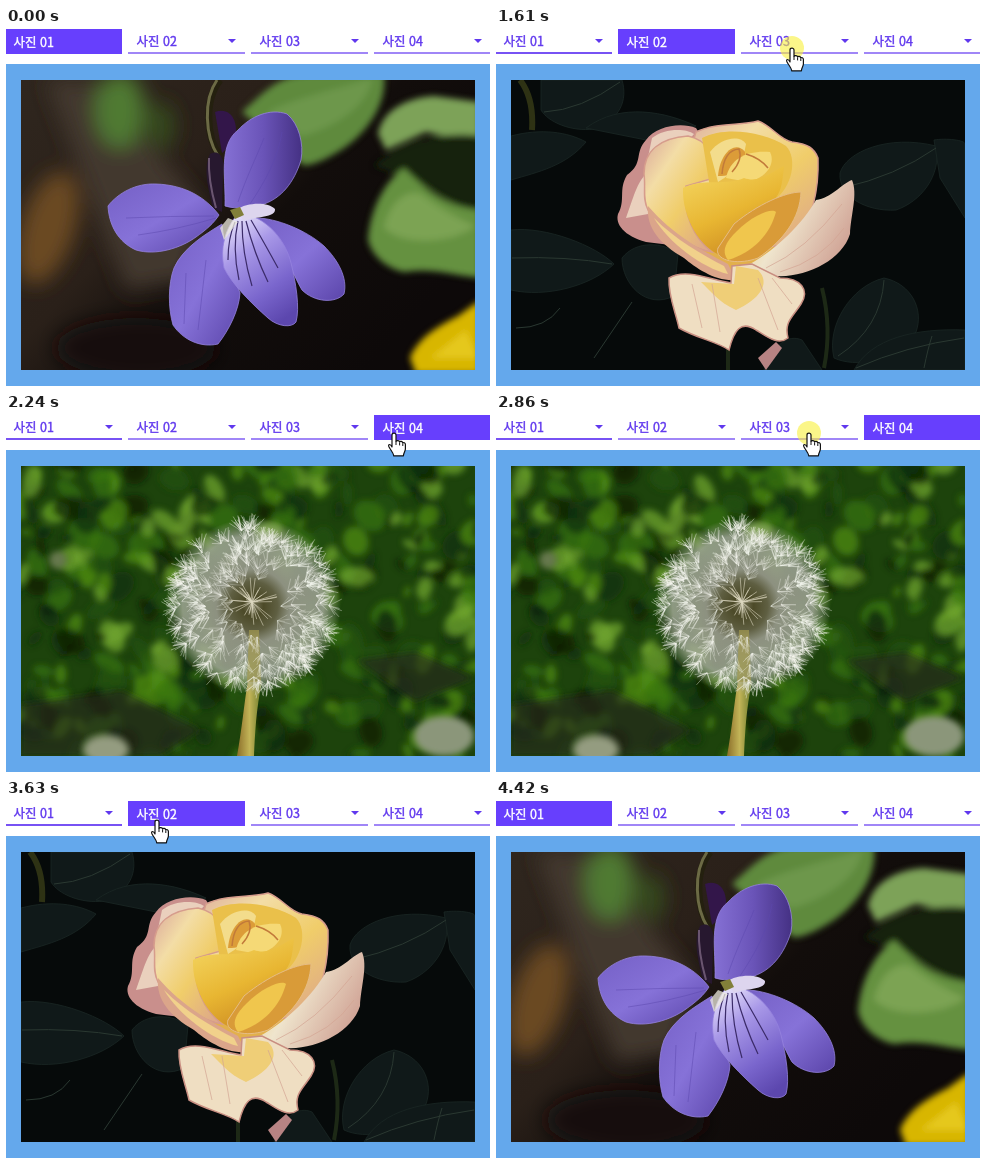
Animation of 484 by 358 pixels, one loop 4.73 s. Source, as an HTML page:

```html
<!DOCTYPE html>
<html lang="ko">
<head>
<meta charset="utf-8">
<title>사진 탭</title>
<style>
  :root { --ink: #6038ee; --loop: 4730ms infinite both; }
  html, body { margin: 0; width: 100%; height: 100%; overflow: hidden; background: #fff; }
  #stage { position: absolute; left: 0; top: 0; width: 484px; height: 358px; overflow: hidden; }
  #frame { position: absolute; left: 0; top: 36px; width: 484px; height: 322px; background: #64a8ec; }
  .photo { position: absolute; left: 15px; top: 52px; width: 454px; height: 290px; overflow: hidden; }

  .tab { position: absolute; top: 1px; width: 117px; height: 25px; --line: #a086f7;
    font: 500 12.5px/23px "Noto Sans CJK KR", "Noto Sans CJK", "Noto Sans", sans-serif;
    color: var(--ink); -webkit-text-stroke: .4px; }
  .tab:first-child { --line: #7752f4; }
  .tab span, .tab b { position: absolute; inset: 0; padding-left: 8.5px; font-weight: 500; white-space: nowrap; }
  .tab span { height: 23px; border-bottom: 2px solid var(--line); }
  .tab span::after { content: ""; position: absolute; left: 100px; top: 10px;
    border: 4.5px solid transparent; border-top-color: var(--ink); border-bottom: 0; }
  .tab b { background: #673ffd; color: #fff; line-height: 25px; }

  .on1 { animation: on1 var(--loop) step-end; }
  .on2 { animation: on2 var(--loop) step-end; }
  .on3 { animation: on3 var(--loop) step-end; }
  .on4 { animation: on4 var(--loop) step-end; }
  @keyframes on1 { 0%, 83.5%, 100% { opacity: 1 } 22.8% { opacity: 0 } }
  @keyframes on2 { 0%, 36.1%, 83.5%, 100% { opacity: 0 } 22.8%, 76.5% { opacity: 1 } }
  @keyframes on3 { 0%, 47.3%, 76.5%, 100% { opacity: 0 } 36.1%, 63.6% { opacity: 1 } }
  @keyframes on4 { 0%, 63.6%, 100% { opacity: 0 } 47.3% { opacity: 1 } }

  #pointer { position: absolute; left: 0; top: 0; width: 1px; height: 1px; overflow: visible;
    animation: move var(--loop) linear, seen var(--loop) step-end; }
  #disc { animation: disc var(--loop) step-end; }
  #hand { animation: hand var(--loop) step-end; }
  #arrow { animation: arrow var(--loop) step-end; }
  @keyframes move {
    0%, 2.96% { transform: translate(218px, 262px) }
    5.5% { transform: translate(152px, 165px) }
    8.5% { transform: translate(92px, 62px) }
    10.8% { transform: translate(94px, 24px) }
    12.9%, 14.1% { transform: translate(133px, 20px) }
    19.2%, 24.6% { transform: translate(162px, 18px) }
    34%, 37.8% { transform: translate(296px, 20px) }
    44.1%, 52.6% { transform: translate(388px, 19px) }
    60.4%, 68.8% { transform: translate(313px, 19px) }
    76.7%, 78.6% { transform: translate(151px, 20px) }
    81%, 83.5% { transform: translate(58px, 18px) }
    92.4%, 100% { transform: translate(426px, 355px) }
  }
  @keyframes seen { 0%, 93.4%, 100% { opacity: 0 } 2.96% { opacity: 1 } }
  @keyframes disc { 0%, 26%, 39.3%, 54.1%, 66.8% { opacity: 1 } 22.8%, 36.1%, 47.3%, 63.6%, 76%, 100% { opacity: 0 } }
  @keyframes hand { 0%, 85%, 100% { opacity: 0 } 10.4% { opacity: 1 } }
  @keyframes arrow { 0%, 85%, 100% { opacity: 1 } 10.4% { opacity: 0 } }
</style>
</head>
<body>
<div id="stage">
  <div class="tab" style="left:-1px"><span>사진 01</span><b class="on1">사진 01</b></div>
  <div class="tab" style="left:122px"><span>사진 02</span><b class="on2">사진 02</b></div>
  <div class="tab" style="left:245px"><span>사진 03</span><b class="on3">사진 03</b></div>
  <div class="tab" style="left:368px"><span>사진 04</span><b class="on4">사진 04</b></div>
  <div id="frame"></div>

  <svg class="photo on1" viewBox="15 52 454 290">
    <defs>
      <filter id="soft" x="-30%" y="-30%" width="160%" height="160%"><feGaussianBlur stdDeviation="3"/></filter>
      <filter id="haze" x="-40%" y="-40%" width="180%" height="180%"><feGaussianBlur stdDeviation="10"/></filter>
      <linearGradient id="soil" x2="1" y2=".6"><stop stop-color="#2f261e"/><stop offset=".4" stop-color="#2a2019"/><stop offset=".62" stop-color="#120d0b"/><stop offset="1" stop-color="#0d0909"/></linearGradient>
      <linearGradient id="violet" x2="1" y2="1"><stop stop-color="#7560c6"/><stop offset=".5" stop-color="#8672d8"/><stop offset="1" stop-color="#5b45aa"/></linearGradient>
      <linearGradient id="violetTop" x2="1"><stop stop-color="#8570d4"/><stop offset=".5" stop-color="#6a54b8"/><stop offset="1" stop-color="#453184"/></linearGradient>
      <linearGradient id="violetLip" x1=".2" x2=".7" y2="1"><stop stop-color="#e6e1fa"/><stop offset=".3" stop-color="#a999e8"/><stop offset=".7" stop-color="#7a66cd"/><stop offset="1" stop-color="#5c47ae"/></linearGradient>
    </defs>
    <path fill="url(#soil)" d="M15 52h454v290H15z"/>
    <g filter="url(#haze)">
      <path fill="#43382e" d="M40 52h50l110 130-20 70-60 10z"/>
      <ellipse cx="42" cy="200" rx="27" ry="58" fill="#6b4a20" transform="rotate(18 42 200)"/>
      <ellipse cx="114" cy="82" rx="25" ry="38" fill="#4f7a31"/>
      <ellipse cx="155" cy="98" rx="14" ry="24" fill="#34491f"/>
      <ellipse cx="130" cy="320" rx="80" ry="30" fill="#120c0a"/>
    </g>
    <g filter="url(#soft)">
      <path fill="#5f8a3e" d="M236 84C258 64 272 48 300 46H378C382 78 358 108 335 122C318 133 304 138 297 137Z"/>
      <path fill="#79a357" d="M262 84C290 70 330 62 366 50C362 78 330 98 296 108Z" opacity=".55"/>
      <path fill="#7da259" d="M372 106C376 84 398 70 428 68L474 74V116L420 104L380 122Z"/>
      <path fill="#12210a" d="M368 138C390 118 425 102 474 108V184C450 182 432 162 408 152Z"/>
      <path fill="#65913f" d="M362 212C364 180 380 152 398 140C416 158 442 180 474 182V250C440 246 428 240 398 244C380 240 366 228 362 212Z"/>
      <path fill="#8bb061" d="M378 200C385 168 408 158 420 170C440 184 452 190 469 198C450 214 400 220 378 200Z" opacity=".6"/>
      <path fill="#d8b606" d="M404 330C412 310 432 298 452 288L474 272V346H410Z"/>
      <path fill="#efd42a" d="M425 330L460 302L472 330Z" opacity=".6"/>
    </g>
    <path d="M214 52C198 72 200 110 214 128" fill="none" stroke="#24200f" stroke-width="7"/>
    <path d="M211 52C197 72 199 108 212 128" fill="none" stroke="#6c6a45" stroke-width="3"/>
    <path fill="#33164a" d="M209 84C226 78 234 96 228 114L216 125Z"/>
    <path fill="#27182f" d="M204 126C214 120 220 132 217 148L216 184L207 180C202 160 197 140 204 126Z"/>
    <path d="M203 130C202 150 206 166 210 180" stroke="#6a5570" fill="none" stroke-width="2"/>
    <g stroke="#9683df" stroke-width=".8">
      <path fill="url(#violetTop)" d="M219 178C220 150 212 118 232 102C245 88 264 80 281 86C293 96 298 116 295 132C288 155 275 170 258 176C245 179 232 182 219 178Z"/>
      <path fill="url(#violet)" d="M213 187C200 170 180 157 150 156C130 155 112 165 102 178C103 197 112 214 130 222C150 228 175 220 190 209C200 202 208 195 213 187Z"/>
      <path fill="url(#violet)" d="M216 196C198 207 177 220 168 240C162 256 162 280 167 297C177 312 195 320 212 316C223 302 233 282 234 265C226 245 218 220 216 196Z"/>
      <path fill="url(#violet)" d="M250 190C270 190 300 202 318 218C332 232 342 250 338 266C329 276 308 274 296 262C286 245 276 215 250 190Z"/>
      <path fill="url(#violetLip)" d="M230 188C219 202 214 220 218 240C226 256 245 275 262 290C272 299 286 300 290 294C294 280 290 255 285 235C280 215 266 196 246 188Z"/>
    </g>
    <path d="M258 110C250 130 240 150 232 174M276 104C272 130 260 152 244 176M120 190Q165 188 208 188M132 207Q170 202 210 190M200 232L192 302M180 245L178 296" fill="none" stroke="#5d48ad" opacity=".5"/>
    <path d="M232 193Q226 220 233 252M236 193Q236 225 246 258M240 193Q248 225 262 254M245 192Q260 218 272 240M229 194Q222 210 222 232" fill="none" stroke="#3b2b69" stroke-width="1.2"/>
    <path fill="#ddd5ee" d="M230 182C242 174 262 174 269 181C270 190 250 188 238 193Z"/>
    <path fill="#eceade" d="M222 190l10 4-14 18-4-12z" opacity=".75"/>
    <path fill="#817f39" d="M224 182l10-3 4 8-9 4z"/>
  </svg>

  <svg class="photo on2" viewBox="15 52 454 290">
    <defs>
      <linearGradient id="cream" x2=".9" y2="1"><stop stop-color="#d9a69a"/><stop offset=".3" stop-color="#f3dda6"/><stop offset=".6" stop-color="#f0cd6a"/><stop offset="1" stop-color="#dca58c"/></linearGradient>
      <linearGradient id="pale" x2="1" y2=".5"><stop stop-color="#edc878"/><stop offset=".45" stop-color="#efe5cd"/><stop offset="1" stop-color="#d1a597"/></linearGradient>
      <linearGradient id="gold" x2=".5" y2="1"><stop stop-color="#f5d967"/><stop offset=".6" stop-color="#e8b632"/><stop offset="1" stop-color="#cf8f24"/></linearGradient>
    </defs>
    <path fill="#060a0a" d="M15 52h454v290H15z"/>
    <g fill="#101919" stroke="#1b2725" stroke-width=".8">
      <path d="M45 52H126C132 72 124 92 98 101C75 104 52 94 45 82Z"/>
      <path d="M90 100C125 74 170 84 200 98L150 112Z"/>
      <path d="M15 108C45 100 72 104 90 114C70 138 42 144 15 152Z"/>
      <path d="M15 202C50 198 100 218 118 236C95 258 50 270 15 262Z"/>
      <path d="M126 230C140 212 168 214 182 226L178 268C150 282 126 256 126 230Z"/>
      <path d="M344 145C350 124 392 106 440 118C446 148 424 174 400 182C370 184 342 168 344 145Z"/>
      <path d="M338 330C330 298 355 258 388 250C416 256 428 282 420 304C395 334 360 340 338 330Z"/>
      <path d="M358 342C375 310 420 300 469 302V342Z"/>
      <path d="M268 342C278 316 292 306 306 312L326 342Z"/>
      <path d="M438 112C450 110 469 112 469 116V190L444 150Z"/>
    </g>
    <path d="M48 84Q85 82 124 54M16 230Q70 228 116 236M346 160Q400 148 440 120M342 328Q385 300 388 252M360 340Q410 318 468 310M20 300Q50 300 64 280M98 330L136 274M428 340Q432 320 436 308" fill="none" stroke="#2a3831" stroke-width="1"/>
    <path d="M24 52Q38 70 36 102" fill="none" stroke="#2e3214" stroke-width="6"/>
    <path d="M232 316V342M326 260Q336 300 328 340" stroke="#1d2916" stroke-width="4" fill="none"/>
    <path fill="#b78383" d="M262 330l18-16 6 6-16 22z"/>
    <path fill="#c98f8c" d="M150 112C160 98 185 94 200 100L230 150L215 222L150 214C128 208 119 196 122 186C130 172 122 162 131 147C148 135 138 125 150 112Z"/>
    <path fill="#ead0bd" d="M156 110C168 100 190 100 198 106L160 148L152 186L130 190C138 168 140 158 148 148Z"/>
    <path fill="#e2b04c" d="M190 130L318 140C323 170 315 196 298 216L262 240L234 244L190 224Z"/>
    <path fill="url(#cream)" stroke="#d69c8c" stroke-width="1.5" d="M200 104C220 94 245 98 262 93C276 98 284 112 296 114C312 116 318 120 322 130C323 160 318 188 300 216L220 224L180 170Z"/>
    <path fill="url(#cream)" stroke="#d69c8c" stroke-width="1.5" d="M148 146C148 122 165 110 192 108C212 112 220 128 218 150L190 158C186 185 198 210 216 224C198 222 168 202 152 182C146 170 150 160 148 146Z"/>
    <path fill="#eac04a" d="M206 110C230 98 268 104 290 118C302 130 296 160 278 172L214 160Z"/>
    <path fill="#f3dc8c" d="M214 124C224 110 244 106 250 116C248 130 240 144 222 154Z"/>
    <path fill="#dc9c38" d="M222 148C224 124 240 112 249 124C250 140 240 148 222 148Z"/>
    <path fill="#f5d976" d="M230 150C234 130 252 122 274 124C280 136 270 150 252 154Z"/>
    <path d="M226 146Q228 122 243 121Q247 132 236 144M250 126Q264 130 272 140" fill="none" stroke="#c27a3a" stroke-width="1.5"/>
    <path fill="url(#gold)" d="M187 160C205 150 232 158 248 150C264 156 278 142 288 138C286 160 284 172 268 178C250 190 238 202 226 228C204 220 186 190 187 160Z"/>
    <path fill="#d99b38" stroke="#e6bd86" d="M238 196C262 176 290 164 305 164C304 190 288 212 262 230C240 238 218 232 222 220Z"/>
    <path fill="#f0c64d" d="M240 204C258 186 276 180 280 184C274 206 258 224 232 232C224 222 232 212 240 204Z"/>
    <path fill="url(#pale)" d="M254 236C282 220 306 196 320 172C336 170 345 156 356 152C362 166 355 186 354 206C346 232 310 250 280 248Z"/>
    <path fill="#dba58a" d="M152 178C176 206 205 222 232 236L240 252C220 254 200 240 188 230C164 216 150 200 152 178Z"/>
    <path fill="#f1d18b" d="M158 190C180 212 205 226 228 238L232 246C206 240 172 214 158 190Z"/>
    <path fill="#efdec2" stroke="#c98f82" stroke-width="1.5" d="M173 250C190 240 215 252 235 255L236 238L256 236L284 250C305 250 314 262 305 276C296 290 288 294 292 310C282 318 270 308 260 302C245 292 238 302 233 322C222 314 200 310 183 300C180 285 172 268 173 250Z"/>
    <path fill="#efc95e" d="M205 254L238 256L240 238L262 242C276 256 262 272 240 282C222 274 214 262 205 254Z" opacity=".75"/>
    <path d="M196 256L206 300M216 256L224 304M262 250L282 302M276 250L296 276M270 240Q310 222 346 176M284 244Q326 232 348 200" fill="none" stroke="#d3a493" opacity=".7"/>
  </svg>

  <svg class="photo on3" viewBox="15 52 454 290">
    <defs>
      <linearGradient id="teal" x2="1" y2=".4"><stop stop-color="#2a5358"/><stop offset=".5" stop-color="#1f474a"/><stop offset="1" stop-color="#12302d"/></linearGradient>
      <linearGradient id="leaf" x2="1" y2="1"><stop stop-color="#78a9b6"/><stop offset=".5" stop-color="#4b7f86"/><stop offset="1" stop-color="#2c5a52"/></linearGradient>
      <linearGradient id="lemon" x2=".6" y2="1"><stop stop-color="#ecd82e"/><stop offset=".55" stop-color="#e2c60a"/><stop offset="1" stop-color="#cfae08"/></linearGradient>
    </defs>
    <path fill="url(#teal)" d="M15 52h454v290H15z"/>
    <g filter="url(#haze)">
      <ellipse cx="45" cy="82" rx="34" ry="30" fill="#2f4640"/>
      <path fill="#6496a4" d="M92 48H128L150 122L128 118Z"/>
      <path fill="#5d8f9c" d="M158 48H220L170 104L150 116Z"/>
      <ellipse cx="62" cy="146" rx="54" ry="22" fill="#437079"/>
      <path fill="#5f93a2" d="M0 208C70 192 150 204 192 214L180 234L0 236Z"/>
      <path fill="#17393a" d="M0 250L180 255L205 350H0Z"/>
      <ellipse cx="120" cy="292" rx="62" ry="24" fill="#22555c"/>
      <ellipse cx="270" cy="86" rx="54" ry="22" fill="#2c5a5a"/>
      <ellipse cx="352" cy="310" rx="36" ry="28" fill="#24504a"/>
      <path fill="#0f2723" d="M370 150l120-50v250h-80l-50-110z"/>
      <ellipse cx="432" cy="178" rx="22" ry="26" fill="#23443a"/>
    </g>
    <g filter="url(#soft)">
      <path fill="#5f8a8a" d="M150 126C165 100 200 96 236 112L200 130Z" opacity=".8"/>
      <path fill="#6e8a2e" d="M340 244C358 262 384 262 382 284C370 298 364 306 360 318C362 290 356 268 340 244Z"/>
      <path d="M15 216L54 192" stroke="#122522" stroke-width="6"/>
    </g>
    <path d="M205 142Q290 116 340 100T455 52" fill="none" stroke="#314d40" stroke-width="6"/>
    <path d="M205 139Q290 113 340 97T455 49" fill="none" stroke="#7a9580" stroke-width="1.5"/>
    <path fill="#426b50" d="M386 52H422L402 69Z"/>
    <path fill="url(#leaf)" d="M365 66C380 64 400 72 420 66C432 80 438 105 440 122C420 130 395 145 382 165C382 150 392 130 388 110C375 100 360 85 365 66Z"/>
    <path d="M402 72Q390 92 392 124" fill="none" stroke="#8db3b8"/>
    <g stroke="#31430f" stroke-width=".8">
      <path fill="#84953a" d="M38 187C50 172 75 158 94 151C108 150 106 164 98 172C84 186 58 190 38 187Z"/>
      <path fill="#a0a62e" d="M85 152C96 136 112 132 126 140L104 150Z"/>
      <path fill="#7b8f34" d="M88 104C100 96 124 96 134 124C124 134 104 126 88 104Z"/>
      <path fill="#4d6b2b" d="M100 166C110 154 126 146 132 140L126 156ZM150 126C158 110 170 112 166 134L154 142Z"/>
      <path fill="#647e2f" d="M134 190C130 174 138 158 150 152C158 166 158 184 140 191ZM164 138C172 118 190 114 200 120C194 136 180 142 168 144Z"/>
      <path fill="#4c692b" d="M160 150C174 150 194 160 194 176C178 180 166 168 160 150ZM184 138C196 128 212 132 213 142C204 150 192 148 184 138Z"/>
      <path fill="#8f9c3a" d="M200 122Q220 112 226 126Q216 132 200 122Z"/>
    </g>
    <path d="M130 126L150 146L170 142M104 156Q128 136 150 146M150 146L146 184M44 185Q78 176 100 158M94 106Q116 112 132 124" fill="none" stroke="#425a20" stroke-width="2"/>
    <path fill="url(#lemon)" d="M232 128C245 118 290 118 320 120C328 111 332 111 335 118C340 140 352 165 349 190C352 205 350 215 349 225C342 245 325 255 318 275C310 290 298 299 288 299C265 297 240 292 225 290C205 287 196 275 186 252L204 240L215 140Z"/>
    <path fill="#c39a08" filter="url(#soft)" d="M279 170C263 190 260 214 268 230C292 230 316 212 320 190C314 174 298 164 279 170Z"/>
    <path d="M266 222L300 180M270 226L312 190M274 228L318 206M268 210L288 174" stroke="#a37a08" stroke-width="1.5"/>
    <path fill="#e6cd1c" d="M232 134C208 140 200 165 199 190C180 215 184 232 208 243C240 246 262 236 265 218C262 205 275 195 279 172C270 150 250 140 232 134Z"/>
    <path d="M232 134C256 138 274 154 279 172C296 168 312 176 320 190M208 243Q240 252 264 226M314 210Q340 206 349 192" fill="none" stroke="#b8980a" opacity=".8"/>
  </svg>

  <svg class="photo on4" viewBox="15 52 454 290">
    <defs>
      <radialGradient id="fluff"><stop stop-color="#77755a"/><stop offset=".12" stop-color="#4c4a28"/><stop offset=".28" stop-color="#5f5f42"/><stop offset=".42" stop-color="#8d9180"/><stop offset=".8" stop-color="#a9ae9f" stop-opacity=".8"/><stop offset="1" stop-color="#a9ae9f" stop-opacity="0"/></radialGradient>
      <linearGradient id="stem"><stop stop-color="#8c6f2a"/><stop offset=".5" stop-color="#c2b457"/><stop offset="1" stop-color="#6a7a2b"/></linearGradient>
    </defs>
    <path fill="#1d430c" d="M15 52h454v290H15z"/>
    <g id="bokeh" filter="url(#soft)"></g>
    <g filter="url(#soft)">
      <path fill="#23281c" d="M15 290l100-14 80 40-40 26H15zM350 246l60-8 59 26-60 24z" opacity=".6"/>
      <ellipse cx="100" cy="336" rx="22" ry="14" fill="#949c80"/>
      <ellipse cx="438" cy="322" rx="30" ry="20" fill="#8b967a"/>
      <circle cx="52" cy="146" r="9" fill="#66784e"/>
    </g>
    <path fill="url(#stem)" d="M242 266L256 268C250 295 249 320 248 342H231C236 315 238 290 242 266Z"/>
    <circle cx="247" cy="192" r="88" fill="url(#fluff)"/>
    <path fill="#a49a50" d="M243 216h10l2 52h-14z" opacity=".7"/>
    <g id="seeds" fill="none" stroke="#f4f5ee" stroke-width=".7"></g>
    <path id="core" fill="none" stroke="#ddd9c2" stroke-width=".8" opacity=".75"/>
  </svg>

  <svg id="pointer">
    <circle id="disc" r="12" fill="#f8f03a" fill-opacity=".6"/>
    <path id="arrow" d="M0 0V16L4 12.5L6.6 18.5L9 17.4L6.4 11.6H11.6Z" fill="#fff" stroke="#000"/>
    <g id="hand">
      <path d="M-2 14V2C-2 -.4 2 -.4 2 2V8.5C2.5 7 5.4 7.4 5.6 9C6.2 7.8 8.6 8.4 8.8 10C9.6 9 11.4 9.8 11.4 11.6V16C11.4 18 9.6 19.6 9.4 22.8H-.2C-.6 19.8-3.6 17-5.2 13.4C-6 11-3.6 10.6-2 14Z" fill="#fff" stroke="#111" stroke-width="1.2" stroke-linejoin="round"/>
      <path d="M2 8.5V12M5.6 9.4V12.4M8.8 10.4V13" stroke="#111"/>
    </g>
  </svg>
</div>
<script>
  const NS = "http://www.w3.org/2000/svg";
  const byId = id => document.getElementById(id);
  let seed = 11;
  const rnd = () => (seed = seed * 16807 % 2147483647) / 2147483647;
  const add = (parent, tag, attrs) => {
    const node = document.createElementNS(NS, tag);
    for (const key in attrs) node.setAttribute(key, attrs[key]);
    byId(parent).append(node);
  };
  const ray = (x, y, a, len) =>
    `M${x.toFixed(1)} ${y.toFixed(1)}l${(Math.cos(a) * len).toFixed(1)} ${(Math.sin(a) * len).toFixed(1)}`;

  // Blurred foliage, lighter towards the top.
  const greens = ["#0b1f07", "#12300a", "#23520d", "#38750f", "#529016", "#74aa30"];
  for (let i = 0; i < 420; i++) {
    const x = 10 + rnd() * 464, y = 45 + rnd() * 300;
    const tone = Math.floor(rnd() * (y < 245 ? 6 : 5));
    const size = 5 + rnd() * 13;
    add("bokeh", "ellipse", {
      cx: x, cy: y, rx: size, ry: size * (.4 + rnd() * .5),
      fill: greens[tone], opacity: .7, transform: `rotate(${rnd() * 180} ${x} ${y})`
    });
  }

  // Parachutes: small fans of hairs opening outwards.
  for (let i = 0; i < 230; i++) {
    const a = rnd() * Math.PI * 2, r = 14 + 64 * Math.sqrt(rnd());
    const x = 247 + Math.cos(a) * r, y = 192 + Math.sin(a) * r;
    let d = "";
    for (let k = 0; k < 8; k++) d += ray(x, y, a + (rnd() - .5) * 2.2, 7 + rnd() * 10);
    add("seeds", "path", { d, opacity: .25 + r / 78 * .35 });
  }

  let core = "";
  for (let i = 0; i < 40; i++) core += ray(246, 188, rnd() * Math.PI * 2, 6 + rnd() * 24);
  byId("core").setAttribute("d", core);
</script>
</body>
</html>
```
